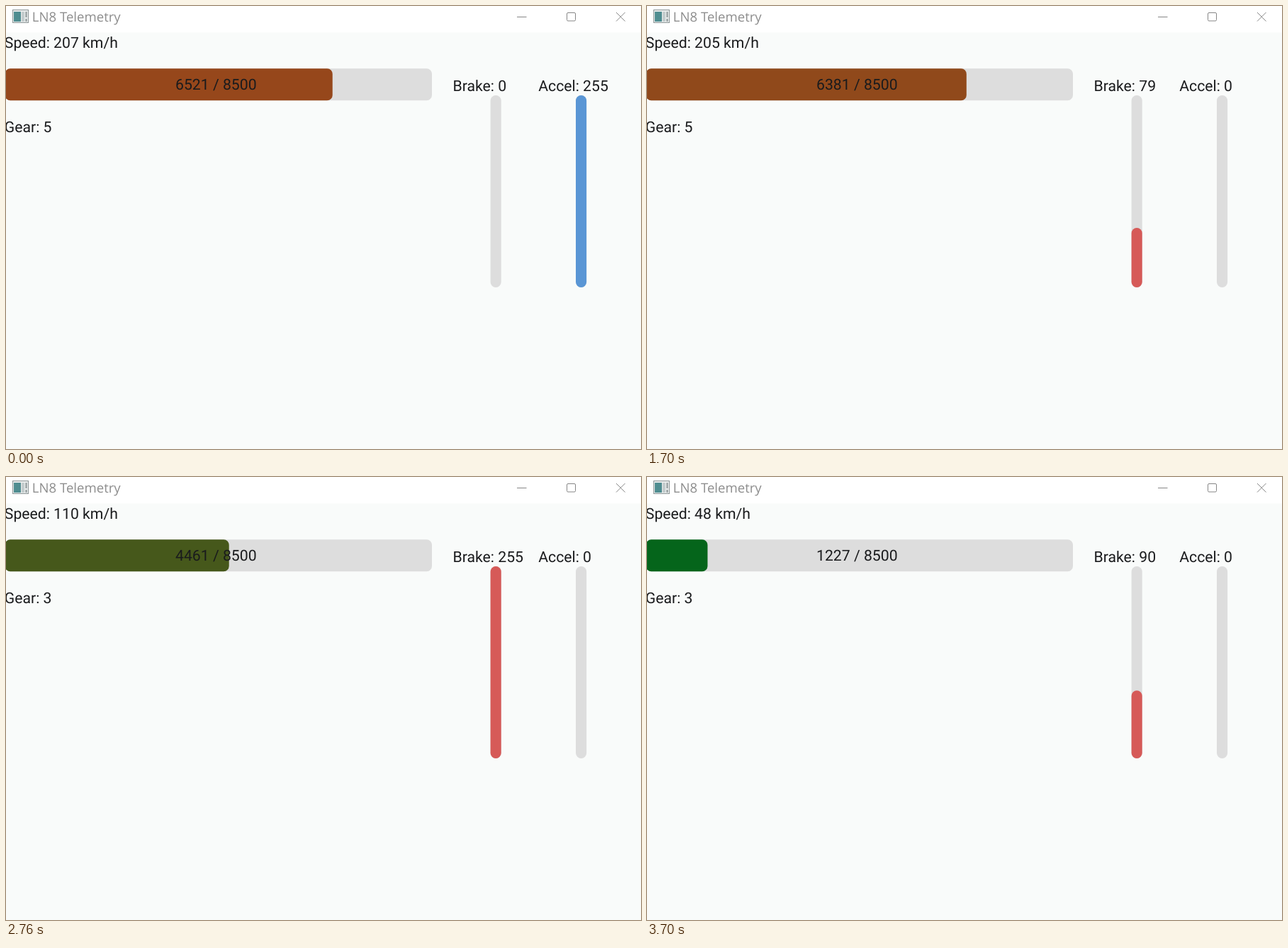
Write an HTML page that moves like this. It is 896 px wide and 625 px high and loops after 3.77 s.

```html
<!DOCTYPE html>
<html lang="en">
<head>
<meta charset="utf-8">
<title>Telemetry</title>
<style>
  html, body { margin: 0; width: 100%; height: 100%; overflow: hidden; background: #f9fbfa; }
  svg { display: block; }
  text { font: 21.2px Roboto, sans-serif; fill: #1a1b1d; white-space: pre; text-rendering: geometricPrecision; }
  .title { font: 18.6px "Open Sans", sans-serif; fill: #8e8e8e; }
  .track { fill: #ddd; }
</style>
</head>
<body>
<svg width="896" height="625" viewBox="0 0 896 625">
  <rect width="896" height="37.5" fill="#fff"/>

  <rect x="9.5" y="5.5" width="22" height="18" fill="#e9ecec" stroke="#8c9596"/>
  <rect x="11" y="8" width="10" height="14" fill="#4f8d90"/>
  <rect x="22" y="8" width="4" height="14" fill="#c3cccd"/>
  <path d="M28.5 8v8M28.5 18v4" stroke="#8c9596" stroke-width="2"/>
  <text class="title" x="36.8" y="21.5">LN8 Telemetry</text>
  <g fill="none" stroke="#868686">
    <path d="M721 15.5h13.5M861 9l12.5 12.5M873.5 9L861 21.5"/>
    <rect x="791.5" y="9.5" width="12" height="11.5" rx="1.5"/>
  </g>

  <text id="speed" x="-2.2" y="59"></text>
  <rect class="track" x="-1.5" y="88.2" width="602.5" height="45" rx="7.5"/>
  <rect id="rpmBar" x="-1.5" y="88.2" height="45" rx="7.5"/>
  <text id="rpm" x="296.3" y="118" text-anchor="middle"></text>
  <text id="gear" x="-2.2" y="178"></text>

  <text id="brake" x="630.6" y="119.5"></text>
  <rect class="track" x="683.6" y="126" width="15.1" height="271" rx="7.5"/>
  <rect id="brakeBar" x="683.6" width="15.1" rx="7.5" fill="#d65a58"/>
  <text id="accel" x="751.3" y="119.5"></text>
  <rect class="track" x="804" y="126" width="15.1" height="271" rx="7.5"/>
  <rect id="accelBar" x="804" width="15.1" rx="7.5" fill="#5a96d5"/>
</svg>
<script>
const LOOP = 3770, REFRESH = 67, MAX_RPM = 8500, FULL = 255;
const $ = id => document.getElementById(id);
const clamp = v => Math.round(Math.min(FULL, Math.max(0, v)));

// Drive: [refresh count, speed, rpm], joined by straight lines
const drive = [
  [0, 207, 6521], [21, 219, 6876], [23, 218, 6850], [29, 180, 5443],
  [35, 141, 3971], [41, 110, 4461], [49, 75, 1935], [55, 48, 1227]
];

function sample(n) {
  const i = Math.max(1, drive.findIndex(p => p[0] >= n));
  const [a, b] = [drive[i - 1], drive[i]];
  const k = (n - a[0]) / (b[0] - a[0]);
  return a.map((v, j) => Math.round(v + (b[j] - v) * k));
}

// Pressed from count 23, released to 85 at count 49, then eased on again
function brakeAt(n) {
  const press = (n - 23) * 39.3;
  const release = 85 + Math.max((49 - n) * 34, (n - 49) * 0.8);
  return clamp(Math.min(press, release));
}

const accelAt = n => clamp((24 - n) / 3 * FULL);

function pedal(id, label, value) {
  const h = 271 * value / FULL, bar = $(id + "Bar");
  $(id).textContent = `${label}: ${value}`;
  bar.setAttribute("y", 397 - h);
  bar.setAttribute("height", h);
}

function draw(n) {
  const [, speed, rpm] = sample(n);
  const part = rpm / MAX_RPM, heat = part * part;
  $("speed").textContent = `Speed: ${speed} km/h`;
  $("rpm").textContent = `${rpm} / ${MAX_RPM}`;
  $("rpmBar").setAttribute("width", 602.5 * part);
  $("rpmBar").setAttribute("fill", `rgb(${255 * heat}, ${102 - 52 * heat}, 27)`);
  $("gear").textContent = `Gear: ${n < 33 ? 5 : n < 39 ? 4 : 3}`;
  pedal("brake", "Brake", brakeAt(n));
  pedal("accel", "Accel", accelAt(n));
}

let start;
function tick(now) {
  start ??= now;
  const t = Math.max(0, now - start) % LOOP;
  draw(Math.min(55, Math.floor(t / REFRESH)));
  requestAnimationFrame(tick);
}
draw(0);
requestAnimationFrame(tick);
</script>
</body>
</html>
```
